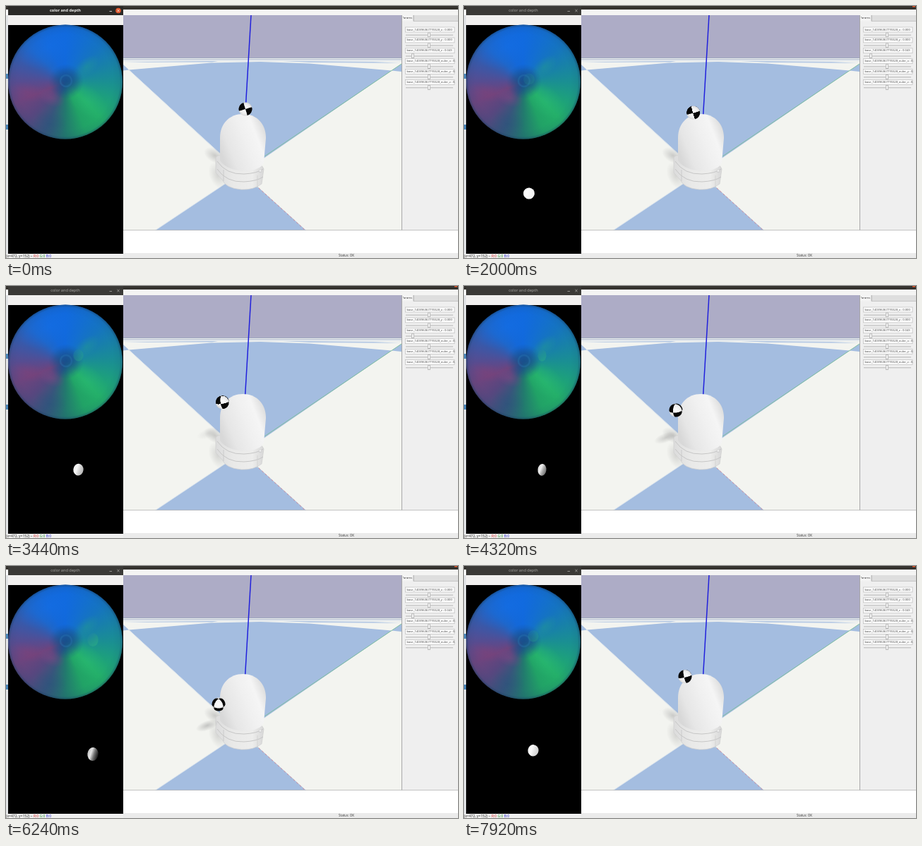
Write an HTML page with a canvas that moves like this. It is 640 by 357 pixels and loops after 8000 ms.

```html
<!DOCTYPE html>
<html lang="en">
<head>
<meta charset="utf-8">
<title>Tactile sensor simulation</title>
<style>
html, body { margin: 0; width: 100%; height: 100%; overflow: hidden; background: #000; }
canvas { display: block; width: 640px; height: 357px; }
</style>
</head>
<body>
<canvas id="stage" width="640" height="357"></canvas>
<script>
const W = 640, H = 357, LOOP = 8000, STEP = 80;
const ctx = document.getElementById('stage').getContext('2d');

function layer(w, h) {
  const c = document.createElement('canvas');
  c.width = w;
  c.height = h;
  return c;
}

function rect(g, x, y, w, h, fill) {
  g.fillStyle = fill;
  g.fillRect(x, y, w, h);
}

function poly(g, fill, ...p) {
  g.beginPath();
  for (let i = 0; i < p.length; i += 2) g.lineTo(p[i], p[i + 1]);
  g.closePath();
  g.fillStyle = fill;
  g.fill();
}

function line(g, color, width, x1, y1, x2, y2) {
  g.strokeStyle = color;
  g.lineWidth = width;
  g.beginPath();
  g.moveTo(x1, y1);
  g.lineTo(x2, y2);
  g.stroke();
}

function oval(g, fill, x, y, rx, ry = rx, turn = 0) {
  g.beginPath();
  g.ellipse(x, y, rx, ry, turn, 0, 7);
  g.fillStyle = fill;
  g.fill();
}

function text(g, s, x, y, font, color, align = 'left') {
  g.font = font;
  g.fillStyle = color;
  g.textAlign = align;
  g.textBaseline = 'middle';
  g.fillText(s, x, y);
}

function ramp(grad, ...stops) {
  for (const [at, color] of stops) grad.addColorStop(at, color);
  return grad;
}

function glow(g, color, x, y, rx, ry = rx, turn = 0) {
  g.save();
  g.translate(x, y);
  g.rotate(turn);
  g.scale(rx, ry);
  oval(g, ramp(g.createRadialGradient(0, 0, 0, 0, 0, 1), [0, color], [1, color.slice(0, 7) + '00']), 0, 0, 1);
  g.restore();
}

function drawFloor(g) {
  const blue = '#a4bde0', floor = '#f3f4f0';
  rect(g, 166, 13, 394, 61, '#adacc6');
  rect(g, 166, 73, 394, 245, floor);
  rect(g, 166, 73, 394, 1, '#9ba5bd');
  rect(g, 166, 75, 394, 1, '#aab7cf');
  rect(g, 166, 77, 394, 1, '#d3dce8');
  poly(g, '#b4c8e4', 200, 79, 300, 78, 292, 79.5, 166, 80);
  poly(g, '#b4c8e4', 392, 78, 520, 79, 560, 81, 430, 80);
  poly(g, blue, 174, 90.5, 290, 80.5, 360, 79, 430, 81.5, 546, 91.5, 334, 237);
  poly(g, blue, 166, 83, 174, 90.5, 166, 91.5);
  poly(g, blue, 560, 82, 546, 91.5, 560, 93);
  poly(g, blue, 334, 236, 211, 318, 425, 318);
  line(g, '#dce5ee', 1, 174, 90.5, 310, 216);
  line(g, '#dce5ee', 1, 310, 252, 211, 318);
  line(g, '#7fbfa0', 1, 366, 213, 560, 82);
  g.setLineDash([3, 3]);
  line(g, '#d68a96', 1, 358, 258, 424, 318);
  g.setLineDash([]);
}

function drawDome(g) {
  glow(g, '#9a9a9a77', 296, 212, 17, 10, 0.5);
  glow(g, '#99999955', 300, 240, 12, 20, -0.4);

  g.beginPath();
  g.moveTo(297, 214);
  g.quadraticCurveTo(303, 208, 312, 216);
  g.lineTo(350, 230);
  g.quadraticCurveTo(362, 221, 365, 231);
  g.lineTo(362, 252);
  g.quadraticCurveTo(350, 261, 333, 260);
  g.quadraticCurveTo(311, 258, 306, 246);
  g.lineTo(297, 236);
  g.closePath();
  g.fillStyle = ramp(g.createLinearGradient(297, 0, 366, 0), [0, '#dcdcdc'], [0.35, '#e9e9e8'], [0.75, '#ededec'], [1, '#d6d6d6']);
  g.fill();
  g.strokeStyle = '#cfcfcf';
  g.lineWidth = 0.7;
  g.stroke();

  g.beginPath();
  g.moveTo(303, 219);
  g.lineTo(303, 187);
  g.bezierCurveTo(303, 166, 317, 153, 335.5, 153);
  g.bezierCurveTo(354, 153, 368, 166, 368, 187);
  g.lineTo(365, 222);
  g.bezierCurveTo(360, 237, 316, 239, 303, 219);
  g.closePath();
  g.fillStyle = ramp(g.createLinearGradient(303, 205, 368, 180), [0, '#d8d8d8'], [0.2, '#e6e6e6'], [0.55, '#f0f0f0'], [0.8, '#f5f5f5'], [1, '#dedede']);
  g.fill();

  g.strokeStyle = '#c2c2c2';
  g.lineWidth = 0.9;
  for (const y of [220, 231]) {
    g.beginPath();
    g.moveTo(299, y);
    g.quadraticCurveTo(312, y + 19, 337, y + 18);
    g.quadraticCurveTo(356, y + 17, 364, y + 11);
    g.stroke();
  }
  oval(g, '#d0d0d0', 360, 234, 2.6, 2);
  oval(g, '#f6f6f6', 360, 233.5, 1.5, 1);
  line(g, '#c6c6c6', 0.8, 308, 232, 308, 248);
  line(g, '#d0d0d0', 0.8, 356, 240, 356, 258);
}

function drawPanel(g) {
  const font = '4.15px "Open Sans", sans-serif';
  rect(g, 560, 13, 80, 305, '#efefef');
  rect(g, 561, 13, 79, 8, '#dedede');
  line(g, '#a9a9a9', 1, 560.5, 13, 560.5, 318);
  rect(g, 561, 13, 16, 8.5, '#f4f4f4');
  line(g, '#8d8d8d', 0.7, 577, 13, 577, 21.5);
  line(g, '#b5b5b5', 0.7, 577, 21.5, 640, 21.5);
  g.save();
  g.beginPath();
  g.rect(562, 12, 14, 10);
  g.clip();
  text(g, 'Params', 560.5, 17, '4.2px "Open Sans", sans-serif', '#333');
  g.restore();

  const labels = ['x : 0.000', 'y : 0.000', 'z : 0.043', 'euler_x : 0.', 'euler_y : 0.', 'euler_z : 0.'];
  labels.forEach((label, i) => {
    const y = 33.5 + i * 14.9, knob = i === 2 ? 576 : 599;
    rect(g, 565, y - 3.7, 70, 7.4, '#fbfbfb');
    g.strokeStyle = '#bcbcbc';
    g.lineWidth = 0.7;
    g.strokeRect(565.5, y - 3.5, 69.5, 7);
    g.save();
    g.beginPath();
    g.rect(567, y - 4, 70, 8);
    g.clip();
    text(g, 'base_140396367776528_' + label, 567.5, y, font, '#444');
    g.restore();
    rect(g, 566, y + 7, 67, 1.4, '#c6c6c6');
    rect(g, knob - 2, y + 4.2, 4, 6.5, '#aaa');
    rect(g, knob - 1.3, y + 4.9, 2.6, 5, '#f4f4f4');
  });
}

function drawStatus(g) {
  const font = '5px "Open Sans", sans-serif';
  rect(g, 0, 351, 166, 6, '#f0f0ef');
  let x = 0;
  const parts = [['(x=472, y=152) ~ ', '#222'], ['R:0 ', '#c22'], ['G:0 ', '#1a8a2a'], ['B:0', '#22c']];
  for (const [s, color] of parts) {
    text(g, s, x, 354.5, font, color);
    x += g.measureText(s).width;
  }
  text(g, 'Status: OK', 471, 354, '4.6px "Open Sans", sans-serif', '#333');
}

function drawDisc(g) {
  const x = 84, y = 107.5, r = 81;
  g.save();
  g.beginPath();
  g.arc(x, y, r, 0, 7);
  g.clip();
  const hues = ['#1a8f92', '#1da07c', '#23ae68', '#21a266', '#22796e', '#39567c', '#57477f', '#6d447e',
    '#574c90', '#3a58a8', '#1f66c8', '#1468d8', '#1169dc', '#136ed2', '#1574c0', '#1881a8', '#1a8f92'];
  rect(g, 0, 20, 170, 180, ramp(g.createConicGradient(0, x, y), ...hues.map((h, i) => [i / 16, h])));
  glow(g, '#1270ec77', 60, 58, 45, 28, -0.4);
  glow(g, '#8a407566', 30, 122, 26, 14, 0.2);
  glow(g, '#8a4a8466', 64, 130, 20, 12, 0.4);
  glow(g, '#2cc07866', 115, 134, 34, 20, 0.7);
  glow(g, '#24a08a66', 114, 86, 22, 12, -0.7);
  glow(g, '#274f7c77', 62, 168, 24, 22);
  rect(g, 0, 20, 170, 180, ramp(g.createRadialGradient(x, y, 68, x, y, r), [0, '#1b487000'], [0.7, '#1b487018'], [1, '#16385888']));
  glow(g, '#19508cff', 85, 107, 25);
  glow(g, '#194f8aaa', 85, 107, 20);
  g.strokeStyle = '#2c78b055';
  g.lineWidth = 2.5;
  g.beginPath();
  g.arc(85, 106, 8, 0, 7);
  g.stroke();
  g.restore();
}

function makeBackdrop() {
  const c = layer(W, H), g = c.getContext('2d');
  rect(g, 0, 0, W, H, '#fff');
  rect(g, 0, 0, W, 5, '#35332f');
  rect(g, 166, 5, 474, 8, '#f4f4f3');
  drawFloor(g);
  line(g, '#2020dc', 1.5, 347, 13, 338.5, 157);
  drawDome(g);
  drawPanel(g);
  rect(g, 166, 318, 474, 32, '#fff');
  line(g, '#b8b8b8', 0.8, 166, 317.5, 640, 317.5);
  rect(g, 166, 350, 474, 7, '#ebebeb');
  rect(g, 0, 13, 3, 338, '#e2e4e6');
  rect(g, 0, 96, 3, 7, '#4a86b8');
  rect(g, 0, 168, 3, 7, '#4a86b8');
  rect(g, 3, 13, 163, 14, '#f2f1f0');
  rect(g, 3, 27, 163, 324, '#000');
  drawDisc(g);
  drawStatus(g);
  return c;
}

function drawTitle(g, active) {
  const ink = active ? '#f2f2f0' : '#aaa9a5';
  rect(g, 3, 0, 163, 13, active ? '#2b2a28' : '#3b3a37');
  text(g, 'color and depth', 84, 6.8, (active ? 'bold ' : '') + '5.6px "Open Sans", sans-serif', ink, 'center');
  line(g, ink, 0.8, 146.5, 7.5, 150, 7.5);
  if (active) oval(g, '#e2572c', 159, 6.5, 3.8);
  else rect(g, 635, 0, 4, 1.5, '#e2572c');
  line(g, ink, 0.8, 157.4, 5, 160.6, 8.2);
  line(g, ink, 0.8, 160.6, 5, 157.4, 8.2);
}

// time, ball x/y, contact x/y, contact radii, shading
const keys = [
  [0, 339, 146, 85, 270, 8, 8, 0],
  [1280, 331, 150, 89.5, 268, 8, 8, 0],
  [2640, 318, 153.5, 95, 263, 7.8, 8.2, 0.15],
  [3600, 304.5, 167, 104, 259.8, 7, 8.4, 0.35],
  [4320, 300, 176, 110.5, 260.3, 6, 8.4, 0.6],
  [5440, 299, 188, 119, 263, 6.7, 9, 0.75],
  [6000, 301.5, 197, 123.5, 267, 7.7, 9.6, 1],
  [6240, 301, 196, 123, 266.5, 7.7, 9.6, 1],
  [7040, 304, 173, 110, 260.5, 6.6, 8.4, 0.5],
  [7920, 313, 156.5, 98, 261.3, 7.6, 8.2, 0.2]
];

function slope(i, k) {
  const a = keys[Math.max(i - 1, 0)], b = keys[Math.min(i + 1, keys.length - 1)];
  return (b[k] - a[k]) / (b[0] - a[0]);
}

function pose(t) {
  let i = 0;
  while (i < keys.length - 2 && t >= keys[i + 1][0]) i++;
  const a = keys[i], b = keys[i + 1], d = b[0] - a[0], u = (t - a[0]) / d;
  const v = u * u * (3 - 2 * u);
  return a.slice(1).map((p, j) => {
    const k = j + 1;
    return p + (b[k] - p) * v + d * u * (1 - u) * ((1 - u) * slope(i, k) - u * slope(i + 1, k));
  });
}

const SIZE = 42;
const ball = layer(SIZE, SIZE), ballCtx = ball.getContext('2d');
const pixels = ballCtx.createImageData(SIZE, SIZE);

const turn = (a, b, angle) => [
  a * Math.cos(angle) - b * Math.sin(angle),
  a * Math.sin(angle) + b * Math.cos(angle)
];
const clamp = v => Math.max(0, Math.min(1, v));

// Sphere whose eight octants alternate between black and white.
function paintBall(roll, tip, yaw) {
  const r = 19, mid = (SIZE - 1) / 2;
  for (let py = 0; py < SIZE; py++) {
    for (let px = 0; px < SIZE; px++) {
      let x = (px - mid) / r, y = (py - mid) / r;
      const d = Math.hypot(x, y), depth = Math.sqrt(Math.max(0, 1 - d * d));
      let z = depth;
      [x, y] = turn(x, y, roll);
      [y, z] = turn(y, z, tip);
      [z, x] = turn(z, x, yaw);
      const tone = x * y * z > 0 ? 8 : 205 + 45 * depth;
      const o = (py * SIZE + px) * 4;
      pixels.data.fill(tone, o, o + 3);
      pixels.data[o + 3] = 255 * clamp((1 - d) * r + 0.5);
    }
  }
  ballCtx.putImageData(pixels, 0, 0);
}

function drawContact(g, x, y, rx, ry, shade) {
  const grey = (base, drop) => {
    const v = Math.round(base - drop * shade);
    return `rgb(${v},${v},${v})`;
  };
  oval(g, ramp(g.createLinearGradient(x - rx, y - 2, x + rx, y + 3),
    [0, grey(255, 60)], [0.3, grey(255, 25)], [0.6, grey(255, 140)], [1, grey(255, 245)]), x, y, rx, ry, 0.1);

  const up = y - 162, far = clamp((x - 86) / 32);
  g.globalAlpha = 0.1 + 0.55 * far;
  oval(g, ramp(g.createLinearGradient(x - rx, up - ry, x + rx, up + ry),
    [0, '#1c7cae'], [0.5, '#259a8c'], [1, '#2cb084']), x, up, rx, ry);
  g.globalAlpha = 1;
}

const backdrop = makeBackdrop();

function draw(t) {
  const [bx, by, cx, cy, rx, ry, shade] = pose(t);
  ctx.drawImage(backdrop, 0, 0);
  drawTitle(ctx, t < 80);
  if (t >= 320) drawContact(ctx, cx, cy, rx, ry, shade);

  const low = clamp((by - 156) / 25);
  if (low > 0) {
    ctx.globalAlpha = low;
    glow(ctx, '#8c8c8c77', 287 - low * 2, 204 + (by - 156) * 0.55, 17, 7, -0.35);
    ctx.globalAlpha = 1;
  }
  const fall = (by - 146) / 50;
  paintBall(0.3 * (1 - fall), 0.615 * fall, 0.785 * fall);
  ctx.drawImage(ball, bx - SIZE / 4, by - SIZE / 4, SIZE / 2, SIZE / 2);
}

let start;
function tick(now) {
  start ??= now;
  const t = (now - start) % LOOP;
  draw(Math.floor(t / STEP) * STEP);
  requestAnimationFrame(tick);
}
draw(0);
requestAnimationFrame(tick);
</script>
</body>
</html>
```
